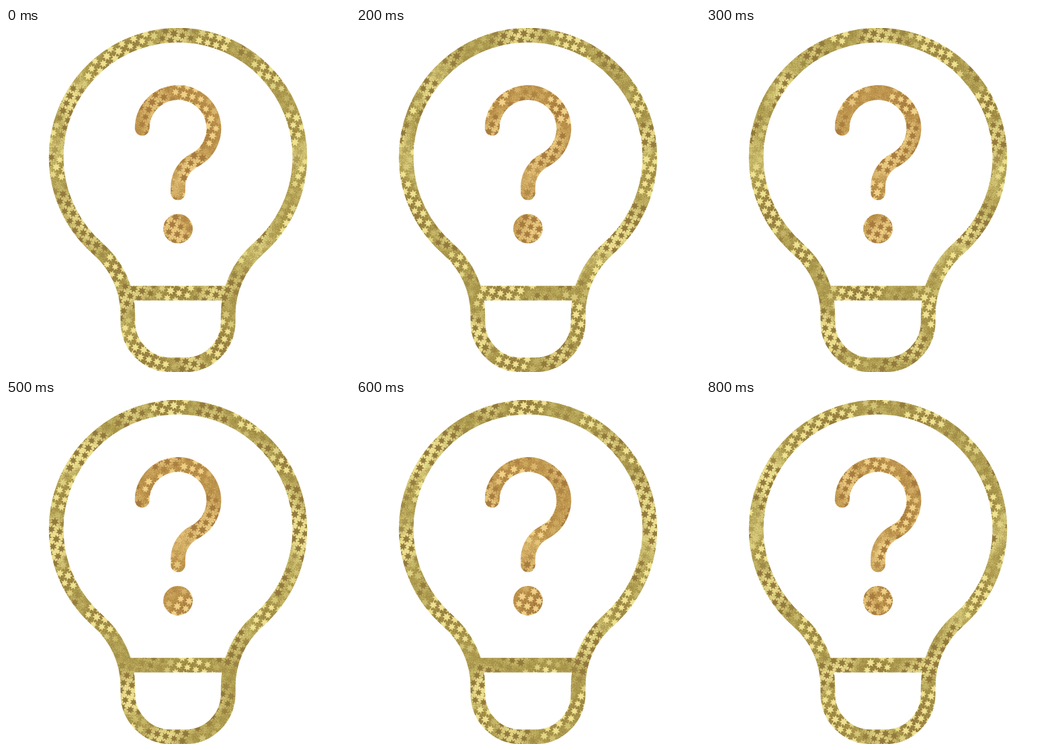
These frames come from a looping animation (512x512 px, 0.9 s). An HTML page with a canvas:

```html
<!DOCTYPE html>
<html lang="en">
<head>
<meta charset="utf-8">
<title>Glittering idea bulb</title>
<style>
  html, body { margin: 0; width: 100%; height: 100%; overflow: hidden; background: #fff; }
  canvas { display: block; width: 100vmin; height: 100vmin; }
</style>
</head>
<body>
<canvas id="stage" width="512" height="512"></canvas>
<script>
const SIZE = 512, UNIT = SIZE / 24, STEPS = 9, STEP_MS = 100;
const ctx = document.getElementById('stage').getContext('2d');

// Shapes on a 24-unit grid
const bulb = new Path2D(
  'M8.5 20A6.1 6.1 0 0 0 6.41 15.4A8.5 8.5 0 1 1 17.59 15.4A6.1 6.1 0 0 0 15.5 20V20.5' +
  'A3 3 0 0 1 12.5 23.5H11.5A3 3 0 0 1 8.5 20.5ZM8.4 18.5H15.6');
const hook = new Path2D('M9.5 7A2.5 2.5 0 1 1 13.166 9.214A2.109 2.109 0 0 0 12 11.09V11.5');
const dot = new Path2D('M10.97 14A1.03 1.03 0 0 1 13.03 14A1.03 1.03 0 0 1 10.97 14Z');

const olive = { dark: [143, 117, 58], mid: [173, 155, 78], light: [242, 231, 150] };
const amber = { dark: [164, 120, 60], mid: [190, 149, 77], light: [243, 213, 139] };

// Bright reflections: x, y, radius
const sheens = [[106, 90, 36], [77, 200, 36], [434, 205, 40], [373, 328, 36], [180, 450, 28], [258, 215, 30]];

const clamp = (v, lo, hi) => Math.min(hi, Math.max(lo, v));
const smooth = (a, b, v) => { const t = clamp((v - a) / (b - a), 0, 1); return t * t * (3 - 2 * t); };
const rgb = c => `rgb(${c.join()})`;

function grain(x, y) {
  let h = Math.imul(x, 374761393) + Math.imul(y, 668265263);
  h = Math.imul(h ^ (h >>> 13), 1274126177);
  return ((h ^ (h >>> 16)) >>> 0) / 4294967296 - 0.5;
}

// Drifting patches, from -1 (dark ground) to 1 (light ground)
function patch(x, y, phase) {
  return 0.6 * Math.sin(x / 20 + y / 36 + 1.6 * Math.sin(y / 31 + phase)) +
         0.5 * Math.sin(y / 23 - x / 39 + 1.7 * Math.cos(x / 35 - phase));
}

function sheen(x, y, phase) {
  let sum = 0;
  sheens.forEach(([sx, sy, r], i) => {
    const shift = 12 * Math.sin(phase + i);
    const dx = x - sx - shift * 0.5, dy = y - sy + shift;
    sum += Math.exp(-(dx * dx + dy * dy) / (r * r));
  });
  return sum;
}

function drawStar(g, x, y, radius, turn) {
  const points = 7;
  g.beginPath();
  for (let i = 0; i < points * 2; i++) {
    const r = i % 2 ? radius * 0.5 : radius;
    const a = turn + i * Math.PI / points;
    g.lineTo(x + r * Math.cos(a), y + r * Math.sin(a));
  }
  g.fill();
}

function makeGround(palette, phase) {
  // The slow tone is sampled on a coarse grid, the grain on every pixel.
  const cell = 4, side = SIZE / cell, tones = new Float32Array(side * side);
  for (let i = 0; i < tones.length; i++) {
    const x = (i % side + 0.5) * cell, y = (Math.floor(i / side) + 0.5) * cell;
    tones[i] = 0.8 * patch(x, y, phase) + 0.5 * sheen(x, y, phase);
  }
  const image = new ImageData(SIZE, SIZE), { dark, mid, light } = palette;
  for (let y = 0, p = 0; y < SIZE; y++) {
    for (let x = 0; x < SIZE; x++, p += 4) {
      const noise = grain(x, y);
      const tone = clamp(tones[(y >> 2) * side + (x >> 2)] + noise * 0.35, -1, 1);
      const end = tone < 0 ? dark : light, k = Math.abs(tone) * 0.9;
      for (let c = 0; c < 3; c++) image.data[p + c] = mid[c] + (end[c] - mid[c]) * k + noise * 14;
      image.data[p + 3] = 255;
    }
  }
  return image;
}

function makeGlitter(palette, step) {
  const phase = step / STEPS * 2 * Math.PI;
  const canvas = document.createElement('canvas');
  canvas.width = canvas.height = SIZE;
  const g = canvas.getContext('2d');
  g.putImageData(makeGround(palette, phase), 0, 0);
  for (let row = -18; row < 50; row++) {
    for (let col = -8; col < 64; col++) {
      const x = col * 12.5 - row * 5, y = row * 11 + col * 3.5;
      if (x < -8 || y < -8 || x > SIZE + 8 || y > SIZE + 8) continue;
      const value = patch(x, y, phase);
      g.globalAlpha = 0.15 + 0.8 * smooth(0, 0.35, Math.abs(value));
      g.fillStyle = rgb(value > 0 ? palette.dark : palette.light);
      drawStar(g, x, y, 6.4 + 1.4 * grain(col, row), 0.3 + 0.6 * grain(row, col));
    }
  }
  const pattern = ctx.createPattern(canvas, 'repeat');
  pattern.setTransform(new DOMMatrix().scale(1 / UNIT));
  return pattern;
}

const glitters = Array.from({ length: STEPS }, (_, step) =>
  ({ olive: makeGlitter(olive, step), amber: makeGlitter(amber, step) }));

function draw(step) {
  const glitter = glitters[step];
  ctx.setTransform(1, 0, 0, 1, 0, 0);
  ctx.clearRect(0, 0, SIZE, SIZE);
  ctx.scale(UNIT, UNIT);
  ctx.lineWidth = 1.02;
  ctx.lineCap = 'butt';
  ctx.strokeStyle = glitter.olive;
  ctx.stroke(bulb);
  ctx.lineCap = 'round';
  ctx.strokeStyle = ctx.fillStyle = glitter.amber;
  ctx.stroke(hook);
  ctx.fill(dot);
}

let start, shown = 0;
function tick(now) {
  start ??= now;
  const step = Math.floor(Math.max(0, now - start) / STEP_MS) % STEPS;
  if (step !== shown) draw(shown = step);
  requestAnimationFrame(tick);
}
draw(shown);
requestAnimationFrame(tick);
</script>
</body>
</html>
```
